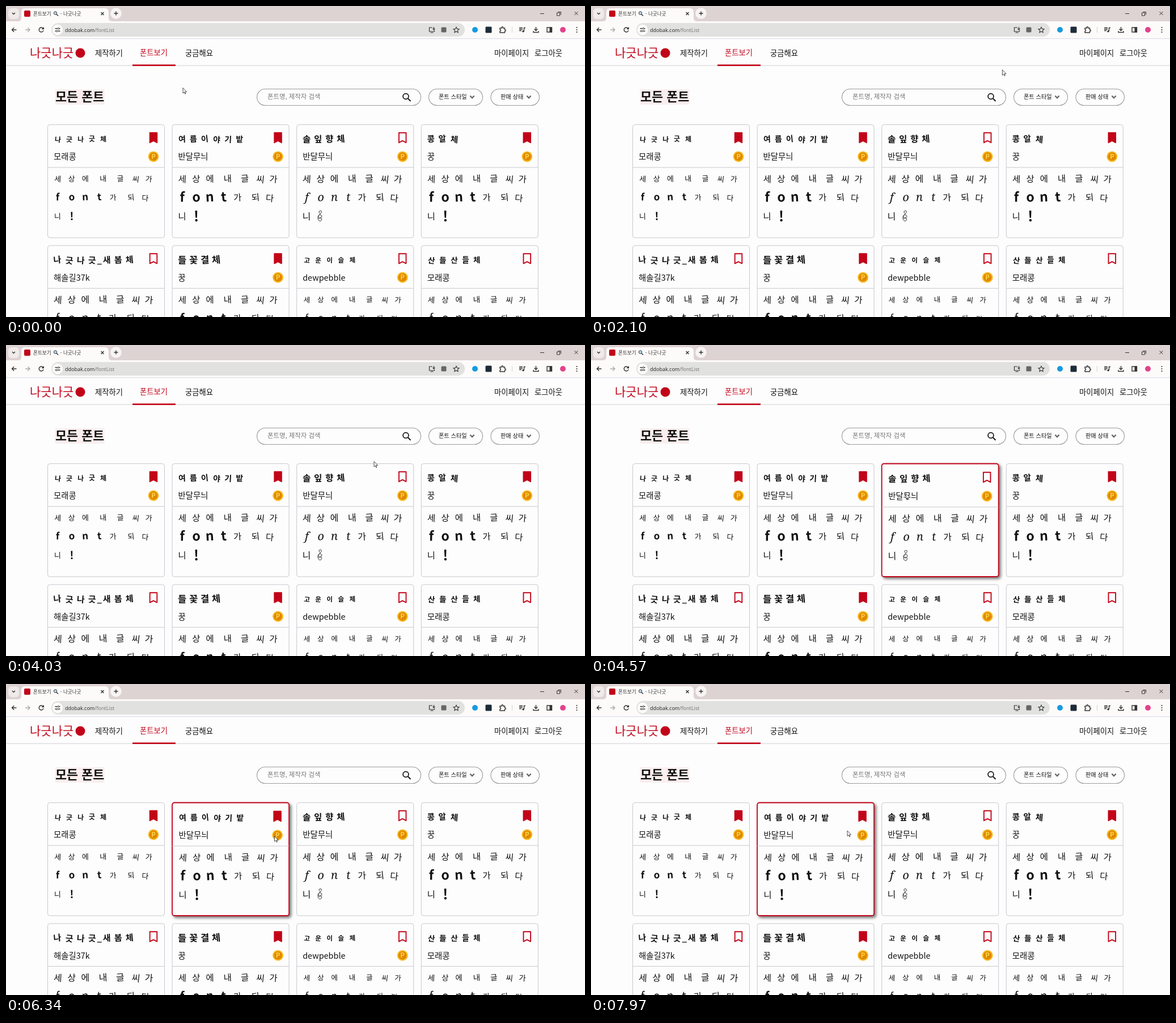
Recreate the animation shown at these times as an HTML page. Size 1021 px wide and 549 px high, loop 8000 ms.

```html
<!DOCTYPE html>
<html lang="ko">
<head>
<meta charset="utf-8">
<title>폰트보기</title>
<style>
html, body { margin: 0; width: 100%; height: 100%; overflow: hidden; background: #fdfdfd; }
svg { display: block; width: 1021px; height: 549px; }
text { font-family: "Noto Sans CJK KR", "Noto Sans CJK", "Noto Sans CJK JP", "Noto Sans", sans-serif; white-space: pre; }
.line { fill: none; stroke: #333; stroke-width: 1.4; }
.frame { fill: #fdfdfd; stroke: #c8c8d0; }
.rule { stroke: #c8c8d0; }
.pill { fill: #fdfdfd; stroke: #9c9c9c; stroke-width: 1.1; }
.on .frame { stroke: #be0418; stroke-width: 1.8; filter: drop-shadow(3px 3px 2.5px #0008); }
.on .rule { transform: translate(0, 1px); }
.on .body { transform: translate(1px, 1px); }
.on .badge { transform: translate(-1px, 1px); }
</style>
</head>
<body>
<svg id="stage" viewBox="0 0 1021 549"></svg>
<script>
const RED = '#c20419', INK = '#111';
const stage = document.getElementById('stage');

// Text centred vertically on y.
const text = (s, x, y, size, fill = INK, weight = 400, extra = '') =>
  `<text x="${x}" y="${y + size * 0.37}" font-size="${size}" fill="${fill}" font-weight="${weight}" ${extra}>${s}</text>`;
const line = (d, extra = '') => `<path class="line" d="${d}" ${extra}/>`;
const rect = (x, y, w, h, r, fill) =>
  `<rect x="${x}" y="${y}" width="${w}" height="${h}" rx="${r}" fill="${fill}"/>`;
const dot = (x, y, r, fill, extra = '') => `<circle cx="${x}" cy="${y}" r="${r}" fill="${fill}" ${extra}/>`;

// Loosely spaced, slightly tilted letters, each centred on its own x.
function letters(s, xs, y, size, weight, extra = '') {
  const tilt = xs.map((_, i) => (i * 37 + s.length * 5) % 13 - 6).join(' ');
  return text(s, xs.map(x => x.toFixed(1)).join(' '), y, size, INK, weight,
    `text-anchor="middle" rotate="${tilt}" ${extra}`);
}

function browser() {
  return rect(0, 0, 1021, 27, 0, '#ddd3d2') + rect(0, 27, 1021, 30, 0, '#fdfbfa') +
    rect(0, 57, 1021, 1.2, 0, '#dedbe8') +
    rect(4, 4, 19, 19, 6, '#f0eaea') + line('M11 12l2.5 2.5L16 12') +
    `<path d="M21 27q6 0 6-6V11q0-7 7-7H174q7 0 7 7V21q0 6 6 6Z" fill="#fdfbfa"/>` +
    rect(32, 8, 11, 11, 2, RED) +
    text('폰트보기', 48, 13.5, 8.6, '#333') +
    dot(87, 12.5, 2.7, '#b9dcf2', 'stroke="#333"') + line('M89 14.5l3 3') +
    text('- 나긋나긋', 95.5, 13.5, 8.6, '#333') +
    line('M167.5 11l5 5m0-5l-5 5') +
    dot(194, 13, 9.8, '#f8f4f3') + line('M190.5 13h7m-3.5-3.5v7') +
    line('M942 13.5h7M971.5 12h5v5h-5zM973.5 10.5h5v5M1002.5 10l6 6m0-6l-6 6', 'style="stroke-width:1"') +
    line('M18.5 42h-8m3.7-3.7L10.5 42l3.7 3.7') +
    line('M34 42h8m-3.7-3.7L42 42l-3.7 3.7', 'style="stroke:#aaa"') +
    line('M65.6 39.8a4 4 0 1 0 .5 3.3M66.3 37.5v3h-3') +
    rect(80, 30, 729, 24, 12, '#e1e2df') + dot(91, 42, 9.2, '#fdfdfb') +
    line('M86.5 39.8h4m3.5 0h1.5M86.5 44.3h1.5m3.5 0h4') +
    dot(92.5, 39.8, 1.4, '#fff', 'stroke="#333"') + dot(89.5, 44.3, 1.4, '#fff', 'stroke="#333"') +
    `<text x="104" y="45.5" font-size="9" fill="#222" style="font-family:'Open Sans',sans-serif">ddobak.com<tspan fill="#747070">/fontList</tspan></text>` +
    line('M752 38h-5.5v7h9v-2M748.5 47h5M754.5 37v5m-2-2l2 2l2-2', 'style="stroke-width:1.2"') +
    rect(767.5, 37.5, 9, 9, 1.5, '#666') +
    line('M794 37.2l1.5 3.2l3.5.4l-2.6 2.4l.7 3.5l-3.1-1.8l-3.1 1.8l.7-3.5l-2.6-2.4l3.5-.4z', 'style="stroke-width:1.1"') +
    dot(827, 42, 5, '#179be0') + rect(845.5, 36.5, 11, 11, 1.5, '#1d2b38') +
    line('M871 39h3v-1a1.3 1.3 0 0 1 2.6 0v1h2.9v3h.5a1.3 1.3 0 0 1 0 2.6h-.5v2.4h-8.5v-2.6a1.5 1.5 0 0 0 0-3z') +
    line('M892.5 37v10', 'style="stroke:#d5cdd0;stroke-width:1"') +
    line('M905 38.5h6M905 41h6M905 43.5h4M913.5 44.5v-6h2.5') + dot(912, 44.7, 1.7, '#333') +
    line('M934.5 37v6.5m-3-3l3 3l3-3M930 44v2.5h9V44') +
    line('M954 38h8.5v8H954z') + rect(958.5, 37.5, 4.5, 9, 0, '#333') +
    dot(982, 42, 5, '#e2438c') +
    dot(1007, 42, 11.5, '#e1dfde', 'id="menuHover"') +
    [38, 42, 46].map(y => dot(1006.5, y, 1.1, '#333')).join('');
}

function header() {
  const chevron = x => line(`M${x - 3.6} 158.5l3.6 3.8l3.6-3.8`, 'style="stroke:#666;stroke-width:2.2"');
  const pill = (x, w) => `<rect class="pill" x="${x}" y="146.5" width="${w}" height="29" rx="14.5"/>`;
  return rect(0, 104.5, 1021, 1.3, 0, '#dcdbe0') +
    text('나긋나긋', 42, 82, 21, RED, 500) + dot(131, 83, 8.5, RED) +
    text('제작하기', 157, 83, 13.3) + text('폰트보기', 236, 82.5, 13.3, RED) +
    text('궁금해요', 316, 83, 13.3) + rect(223, 103.3, 76, 2.7, 0, RED) +
    text('마이페이지', 861, 83, 13.3) + text('로그아웃', 932, 83, 13.3) +
    rect(86.5, 147, 87, 27, 0, '#fbeeee') + text('모든 폰트', 87, 160, 21.8, INK, 700) +
    pill(442.5, 289) + text('폰트명, 제작자 검색', 461, 160, 11.4, '#777') +
    line('M709 163.5l4.5 4.5', 'style="stroke:#111;stroke-width:2"') +
    dot(705, 159.5, 4.9, 'none', 'stroke="#111" stroke-width="1.7"') +
    pill(745.5, 95) + text('폰트 스타일', 763, 160.5, 10.2, INK, 500) + chevron(822) +
    pill(855, 85.5) + text('판매 상태', 872, 160.5, 10.2, INK, 500) + chevron(922);
}

// name, author, saved, coin, name size, name weight, sample size, sample weight, latin size, latin weight
const fonts = [
  ['나긋나긋체', '모래콩', 1, 1, 12, 900, 13, 400, 17, 700],
  ['여름이야기밭', '반달무늬', 1, 1, 14, 700, 15.5, 300, 23, 700],
  ['솔잎향체', '반달무늬', 0, 1, 15.5, 700, 16, 300, 20, 300],
  ['콩알체', '꿍', 1, 1, 14.5, 700, 15.5, 300, 23, 700],
  ['나긋나긋_새봄체', '해솔길37k', 0, 0, 15, 700, 16, 300, 20, 300],
  ['들꽃결체', '꿍', 1, 1, 16.5, 900, 15.5, 500, 20, 700],
  ['고운이슬체', 'dewpebble', 0, 1, 11.5, 700, 12.5, 400, 17, 400],
  ['산들산들체', '모래콩', 0, 0, 13.5, 900, 13.5, 400, 20, 400]
];
const CARD_W = 206, CARD_H = 199.5;
const origin = i => [73.5 + i % 4 * 219.6, 209.5 + (i >> 2) * 213.4];

function card([name, author, saved, coin, ns, nw, ss, sw, ls, lw], i) {
  const [x, y] = origin(i);
  const at = list => list.map(v => x + v);
  // An underscore takes only part of a letter's space.
  const under = name.includes('_') ? name.indexOf('_') : name.length;
  const nameX = at([...name].map((c, k) => 17.5 + 20.2 * k - 7 * Math.min(2, Math.max(0, k - under + 1))));
  const latin = i === 2 ? 'style="font-family:\'Noto Serif\',serif;font-style:italic"' : '';
  const loop = `M${x + 41} ${y + 157}q-4-5 1-5q4 1-1 6q-4 2-3 6q3 3 6-1q1-4-4-4q-4 3-2 9q4 5 6-1q0-4-5-2`;
  return `<g class="card">
    <rect class="frame" x="${x}" y="${y}" width="${CARD_W}" height="${CARD_H}" rx="4"/>
    <path class="rule" d="M${x} ${y + 75.5}h${CARD_W}"/>
    <g class="body">` +
    letters(name, nameX, y + 25.5, ns, nw) +
    text(author, x + 10.5, y + 56.5, 14.4) +
    letters('세상에내글씨가', at([17.5, 42, 66.5, 98, 128.5, 155, 178]), y + 95.5, ss, sw) +
    letters('font', at([17.5, 42.5, 66.5, 91.5]), y + 127.5, ls, lw, latin) +
    letters('가되다', at([115.5, 147.5, 171.5]), y + 129, ss, sw) +
    letters('니', at([17.5]), y + 162, ss, sw) +
    (i === 2 ? line(loop, 'style="stroke:#161616;stroke-width:.9"')
             : letters('!', at([42.5]), y + 161.5, ls + 2, lw)) +
    `</g><g class="badge">
    <path d="M${x + 180.2} ${y + 14.3}h12.6v17.4l-6.3-3.3l-6.3 3.3z" fill="${saved ? RED : '#fdfdfd'}" stroke="${RED}" stroke-width="1.9" stroke-linejoin="round"/>` +
    (coin ? dot(x + 186.5, y + 56.3, 9.4, '#f8b91c') + dot(x + 186.5, y + 56.3, 7.2, '#e08800') +
      text('P', x + 186.5, y + 56.3, 11.5, '#ffd648', 900, 'text-anchor="middle"') : '') +
    '</g></g>';
}

stage.innerHTML = rect(0, 0, 1021, 549, 0, '#fdfdfd') + browser() + header() + fonts.map(card).join('') +
  '<path id="pointer" d="M0 0V9.5L2.2 7.5L3.7 10.8L5 10.2L3.6 7H6.6Z" fill="#fff" stroke="#222" stroke-width=".8"/>';

const pointer = document.getElementById('pointer');
const menuHover = document.getElementById('menuHover');
const cards = [...document.querySelectorAll('.card')];

// time, x, y
const route = [[0, 312, 144.5], [1160, 425, 179.5], [3030, 1020, 47], [4030, 649, 205.5],
  [5040, 480, 308], [6340, 473.5, 268.5], [7970, 452, 259], [8000, 452, 259]];

function pointerAt(t) {
  const i = route.findIndex(p => p[0] > t);
  const [t0, x0, y0] = route[i - 1], [t1, x1, y1] = route[i];
  const u = (t - t0) / (t1 - t0), e = u * u * (3 - 2 * u);
  return [x0 + (x1 - x0) * e, y0 + (y1 - y0) * e];
}

function draw() {
  const [px, py] = pointerAt(performance.now() % 8000);
  pointer.setAttribute('transform', `translate(${px.toFixed(1)} ${py.toFixed(1)})`);
  menuHover.style.opacity = +(px > 995 && py > 28 && py < 56);
  cards.forEach((el, i) => {
    const [x, y] = origin(i);
    el.classList.toggle('on', px > x && px < x + CARD_W && py > y && py < y + CARD_H);
  });
  requestAnimationFrame(draw);
}
draw();
</script>
</body>
</html>
```
